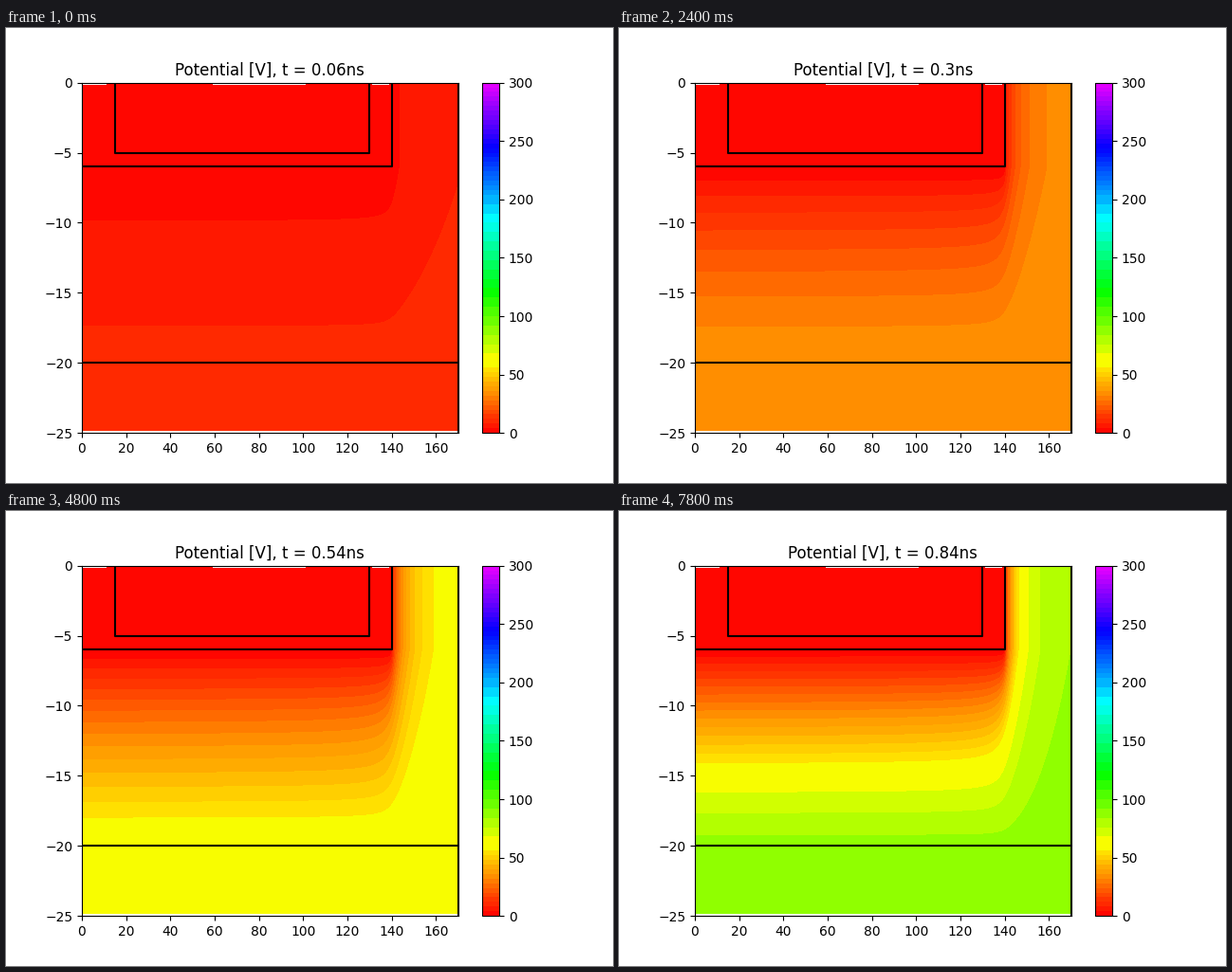
A matplotlib script that plays this animation: 640x480 px, repeating every 8 s.

```python
import numpy as np
import matplotlib.pyplot as plt
from matplotlib.animation import FuncAnimation
from matplotlib.patches import Rectangle

STEP = 4.0          # volts between neighbouring fine levels
FULL_DEPTH = 14.0   # thickness of the depleted layer
SPACE_CHARGE = 4.7  # bow of the vertical profile, in level steps
HOLD = 3            # frames per time step

# Bulk voltage at each time step, in level steps
BULK = [2.07, 4.14, 8.2, 8.5, 8.9, 10.2, 11.95,
        13.95, 15.6, 17.2, 19.7, 20.5, 21.6, 21.9]

LEVELS = np.concatenate([np.arange(0, 57, 4),
                         np.arange(68, 204, 8),
                         np.arange(204, 301, 4)])

X, Y = np.meshgrid(np.linspace(0, 170, 341), np.linspace(-24.85, 0, 300))


def potential(bulk):
    """Voltage around a grounded well with its corner at (140, -6)."""
    depth = np.clip(-6 - Y, 0, None)
    s = np.clip(depth / FULL_DEPTH, 0, 1)
    bow = min(bulk, SPACE_CHARGE) / bulk
    below = 1 - (s + bow * s * (1 - s))

    # Sideways distance from the well, softened below its corner
    side = X - 140
    soft = 4.5 * np.tanh(depth / 6)
    reach = np.clip((side + np.hypot(side, soft)) / 2, 0, None)
    beside = np.exp(-(reach / 6.4) ** 0.75)

    return STEP * bulk * np.clip(1 - below * beside, 0, 1)


def fill(bulk):
    return ax.contourf(X, Y, potential(bulk), levels=LEVELS,
                       cmap="hsv", vmin=0, vmax=360)


def outline(xs, ys):
    ax.plot(xs, ys, color="black", lw=1.5)


fig, ax = plt.subplots(figsize=(6.4, 4.8), dpi=100)
field = fill(BULK[0])
fig.colorbar(field, ax=ax, spacing="proportional", ticks=range(0, 301, 50))

outline([15, 15, 130, 130], [0, -5, -5, 0])
outline([0, 140, 140], [-6, -6, 0])
outline([0, 170], [-20, -20])
outline([170, 170], [0, -25])

# Uncovered slivers along the top edge
for left, right in [(0, 11.3), (59, 101), (131, 139)]:
    ax.add_patch(Rectangle((left, -0.13), right - left, 0.13,
                           color="white", lw=0, zorder=1.5))

ax.set_xlim(0, 170)
ax.set_ylim(-25, 0)
ax.set_xticks(range(0, 161, 20))
ax.set_yticks(range(-25, 1, 5))
title = ax.set_title("")


def update(frame):
    global field
    k = frame // HOLD
    field.remove()
    field = fill(BULK[k])
    title.set_text(f"Potential [V], t = {0.06 * (k + 1):.2g}ns")
    return field, title


anim = FuncAnimation(fig, update, frames=40, interval=200,
                     repeat=True, repeat_delay=0, blit=False)
plt.show()
```
